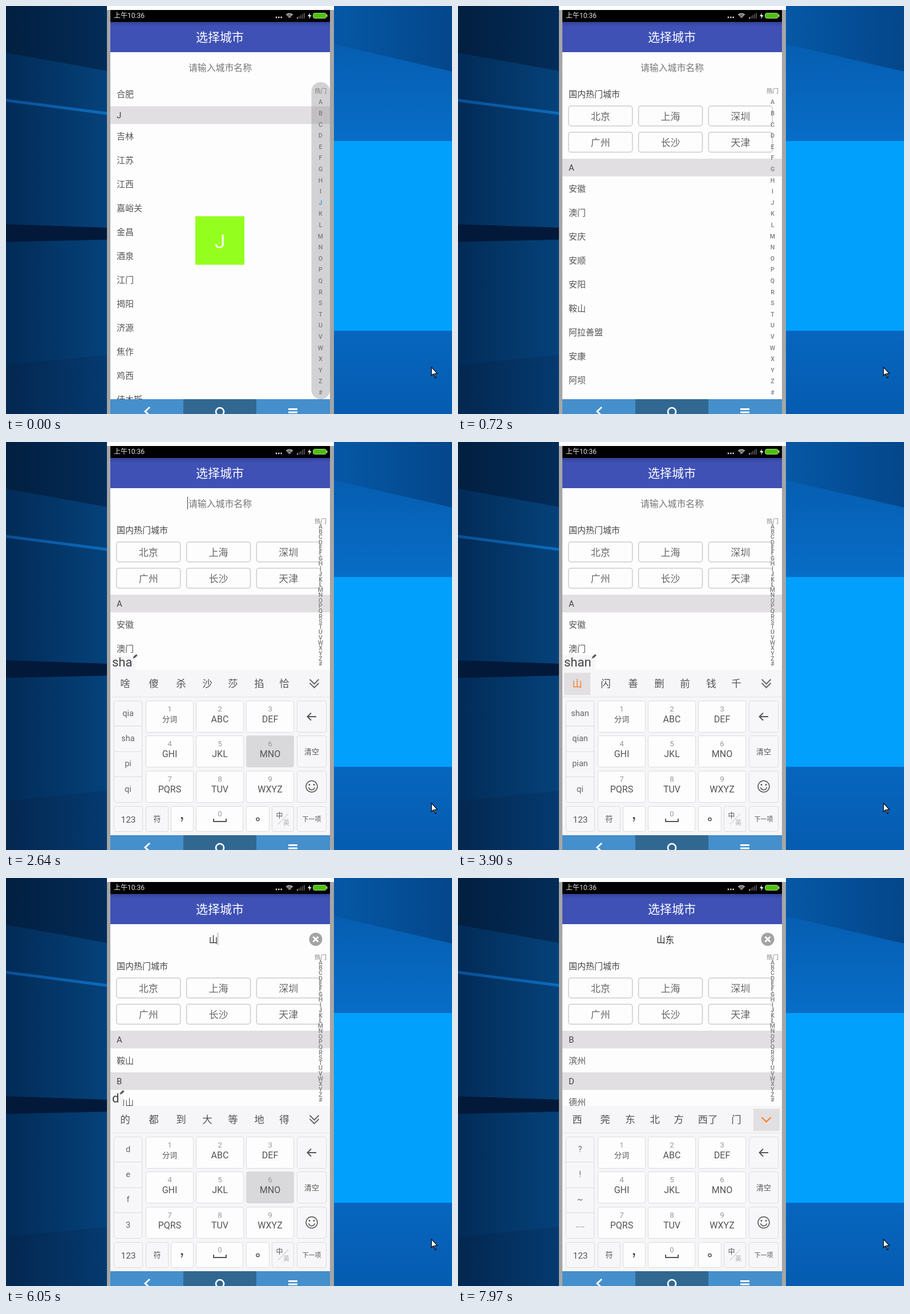
An HTML page with a canvas that plays this animation: 782x716 px, repeating every 8000 ms.

```html
<!DOCTYPE html>
<html lang="zh-CN">
<head>
<meta charset="utf-8">
<title>选择城市</title>
<style>
html, body { margin: 0; width: 100%; height: 100%; overflow: hidden; }
canvas { display: block; }
</style>
</head>
<body>
<canvas id="stage" width="782" height="716"></canvas>
<script>
const g = document.getElementById('stage').getContext('2d');
const LOOP = 8000;
const FONT = 'Roboto, "Noto Sans CJK SC", "Noto Sans CJK", sans-serif';
const INDEX = ['热门', ...'ABCDEFGHIJKLMNOPQRSTUVWXYZ#'];
const words = s => s.split(' ');

// List contents; a single capital is a section header.
const LIST = {
  J: words('合肥 J 吉林 江苏 江西 嘉峪关 金昌 酒泉 江门 揭阳 济源 焦作 鸡西 佳木斯'),
  G: words('阜新 G 广东 甘肃 贵州 广西 广州 贵阳 桂林 赣州 广元 广安 贵港 固原'),
  D: words('楚雄 D 大连 东莞 德州 大庆 东营 丹东 大同 大理 德阳 达州 定西 迪庆'),
  B: words('阿坝 B 北京 白山 保定 包头 宝鸡 北海 蚌埠 滨州 亳州 百色 巴中 白银'),
  all: words('A 安徽 澳门 安庆 安顺 安阳 鞍山 阿拉善盟 安康 阿坝'),
  shan: words('A 鞍山 B 白山'),
  shandong: words('B 滨州 D 德州')
};
const EVEN = [209, 259, 307, 353, 398, 444, 488];
const PAIR_3 = [209, 258, 311, 363, 405, 447, 488];
const PAIR_6 = [209, 258, 302, 345, 387, 438, 488];
const SYMBOLS = ['?', '!', '~', '……'];
const compose = (comp, side, cands, xs = EVEN) => ({ comp, side: words(side), cands: words(cands), xs });
const commit = (text, list, cands) => ({
  text, list, cands: words(cands), xs: PAIR_6, comp: '', side: SYMBOLS, pick: false, caret: true
});
const don = compose('don', 'don en fo d', '东 洞 恶魔 懂 动 冻 冬', PAIR_3);

// Each step changes part of the state at its time.
const STEPS = [
  [0, { list: 'J', drag: 'J', caret: false, text: '', kb: 0, comp: '', side: SYMBOLS, cands: [], xs: EVEN }],
  [150, { list: 'G', drag: 'G', caret: true }],
  [290, { list: 'D', drag: 'D' }],
  [430, { list: 'B', drag: 'B' }],
  [570, { list: 'all', drag: '热门' }],
  [720, { drag: '', caret: false }],
  [1250, { caret: true }],
  [1400, { kb: .4 }],
  [1530, { kb: .85 }],
  [1670, { kb: 1 }],
  [1820, { caret: false }],
  [2250, { caret: true, key: 6 }],
  [2390, { key: 3, ...compose('p', 'p q r s', '去 人 是 请 让 平 跑') }],
  [2520, { key: 1, ...compose('qi', 'qi pi sh ri', '起 其 时 是 使 气 骑') }],
  [2640, { key: 5, ...compose('sha', 'qia sha pi qi', '啥 傻 杀 沙 莎 掐 恰') }],
  [2790, { key: -1, caret: false, ...compose('shan', 'shan qian pian qi', '山 闪 善 删 前 钱 千') }],
  [3190, { caret: true }],
  [3780, { caret: false, pick: true }],
  [3930, commit('山', 'shan', '东 西 上 寨 水 东省 庄')],
  [4480, { caret: false }],
  [5000, { caret: true }],
  [5530, { caret: false }],
  [5900, { caret: true, key: 2 }],
  [6040, { key: 5, ...compose('d', 'd e f 3', '的 都 到 大 等 地 得') }],
  [6190, { key: 5, ...compose('en', 'en fo d e', '嗯 佛 恩 摁 哦 的 额') }],
  [6330, { key: -1, ...don }],
  [6470, { key: 3, caret: false }],
  [6620, { key: -1, ...compose('dong', 'dong en fo d', '东 洞 懂 动 冻 冬 栋') }],
  [6990, { pick: true }],
  [7140, commit('山东', 'shandong', '西 莞 东 北 方 西了 门')],
  [7570, { caret: false }],
  [7970, { fold: true }]
];

function rect(x, y, w, h, fill) {
  g.fillStyle = fill;
  g.fillRect(x, y, w, h);
}
function poly(fill, ...p) {
  g.fillStyle = fill;
  g.beginPath();
  for (let i = 0; i < p.length; i += 2) g.lineTo(p[i], p[i + 1]);
  g.fill();
}
function line(color, width, ...p) {
  g.strokeStyle = color;
  g.lineWidth = width;
  g.beginPath();
  for (let i = 0; i < p.length; i += 2) g.lineTo(p[i], p[i + 1]);
  g.stroke();
}
function box(x, y, w, h, r, fill, stroke, width = 1) {
  g.beginPath();
  g.roundRect(x, y, w, h, r);
  if (fill) { g.fillStyle = fill; g.fill(); }
  if (stroke) { g.strokeStyle = stroke; g.lineWidth = width; g.stroke(); }
}
function arc(x, y, r, color, width, from = 0, to = 2 * Math.PI) {
  g.strokeStyle = color;
  g.lineWidth = width;
  g.beginPath();
  g.arc(x, y, r, from, to);
  g.stroke();
}
function dot(x, y, r, fill) {
  g.fillStyle = fill;
  g.beginPath();
  g.arc(x, y, r, 0, 2 * Math.PI);
  g.fill();
}
// y is the visual middle of the text; the baseline sits on a whole pixel.
function text(s, x, y, size, color, align = 'center', weight = 400) {
  g.font = `${weight} ${size}px ${FONT}`;
  g.textAlign = align;
  g.fillStyle = color;
  g.fillText(s, x, Math.round(y + size * .365));
}
function shade(x0, y0, x1, y1, ...colors) {
  const grad = g.createLinearGradient(x0, y0, x1, y1);
  colors.forEach((c, i) => grad.addColorStop(i / (colors.length - 1), c));
  return grad;
}

function drawDesktop() {
  const across = (...colors) => shade(0, 0, 177, 0, ...colors);
  rect(0, 0, 177, 716, across('#022b57', '#05427a'));
  poly(across('#021f40', '#032c58'), 0, 0, 177, 0, 177, 114, 0, 82);
  poly(across('#0a4f94', '#0b6cbe'), 0, 163, 177, 186, 177, 191, 0, 168);
  poly('#02193a', 0, 383, 177, 389, 177, 410, 0, 414);
  poly(across('#032750', '#053a70'), 0, 630, 177, 612, 177, 716, 0, 716);

  rect(575, 0, 207, 716, shade(0, 0, 0, 716, '#0558a8', '#0768c0', '#0778d4', '#0768c2', '#055cb0'));
  poly(shade(575, 0, 782, 0, '#0558a6', '#04468a'), 575, 0, 782, 0, 782, 115, 575, 67);
  rect(575, 237, 333, 333, '#00a0fc');

  poly('#000', 745.5, 632.5, 745.5, 650, 749.5, 646.5, 752.5, 653, 755, 652, 752.3, 645.5, 757.5, 645.5);
  poly('#fff', 746.7, 635.5, 746.7, 647.3, 750, 644.5, 753, 651, 753.6, 650.7, 750.8, 644.4, 755, 644.4);
}

function drawChrome() {
  rect(177, 0, 398, 7, '#fff');
  rect(177, 7, 398, 709, '#a6a6a6');
  rect(183, 7, 385, 683, '#fdfdfd');
  rect(183, 7, 385, 21, '#000');
  text('上午10:36', 189, 17, 12, '#e4e4e4', 'left');
  for (let i = 0; i < 3; i++) dot(474 + i * 4.3, 20, 1.4, '#ddd');
  for (const r of [3, 6, 8.5]) arc(497, 22, r, '#ddd', 1.6, -2.3, -.84);
  for (let i = 0; i < 5; i++) rect(510 + i * 3, 20 - i * 2, 2, 2 + i * 2, i < 1 ? '#ccc' : '#4a4a4a');
  poly('#eee', 533, 12, 529, 18, 532, 18, 531, 23, 535.5, 16, 532.5, 16);
  box(538.5, 12.5, 23, 9, 3, '#4fc00c', '#a5d98c');
  rect(562, 15, 1.5, 4, '#a5d98c');

  rect(183, 28, 385, 53, '#3f51b5');
  rect(183, 28, 385, 8, shade(0, 28, 0, 36, '#33429a', '#3f51b5'));
  text('选择城市', 375, 54.6, 21, '#fff');
}

function drawNav() {
  rect(183, 690, 385, 26, '#448fcc');
  rect(311, 690, 128, 26, '#306892');
  line('#fff', 3, 252, 704, 244, 711.5, 252, 719);
  arc(375, 712, 7, '#fff', 2.6);
  rect(495, 706, 16, 3, '#fff');
  rect(495, 711.5, 16, 3, '#fff');
}

function drawSearch(s) {
  if (s.text) {
    text(s.text, 363.5, 108, 15.5, '#222');
    dot(543, 107.5, 11.5, '#a3a3a3');
    line('#fff', 2.8, 538.5, 103, 547.5, 112);
    line('#fff', 2.8, 547.5, 103, 538.5, 112);
  } else text('请输入城市名称', 375.5, 108, 15.9, '#777');
  if (s.caret) rect(s.text ? 363 + 8 * s.text.length : 318, 96, 1, 22, s.text ? '#999' : '#444');
}

function drawList(name) {
  let y = 133.5;
  if (LIST[name][0].length === 1) {
    text('国内热门城市', 194, 154.8, 15, '#444', 'left');
    words('北京 上海 深圳 广州 长沙 天津').forEach((city, i) => {
      const x = 193.7 + i % 3 * 122.8, top = i < 3 ? 175.5 : 221.5;
      box(x, top, 112, 35, 4, '#fdfdfd', '#cbcbcb', 1.5);
      text(city, x + 56, top + 18, 17, '#666');
    });
    y = 267.5;
  }
  for (const row of LIST[name]) {
    const head = row.length === 1, h = head ? 31.4 : 42;
    if (head) rect(183, Math.round(y), 385, 31, '#e1dfe2');
    text(row, 194, y + h / 2 + .4, 15, head ? '#444' : '#555', 'left');
    y += h;
  }
}

function drawIndex(s) {
  const tight = s.kb >= .85, top = tight ? 138.7 : 149, gap = tight ? 9.28 : 19.6;
  if (s.drag) box(535.5, 133.5, 32.5, 556.5, 16, 'rgba(140,138,142,.38)');
  INDEX.forEach((c, i) => text(c, 551.5, top + i * gap, 10.6, c === s.drag ? '#2a96ee' : '#7d7d7d', 'center', 500));
  if (s.drag) {
    rect(332, 369, 86, 85, '#94ff1e');
    text(s.drag, 375, 413, 33, '#fff');
  }
}

function drawKey(x, y, w, h, plain, down) {
  box(x + .5, y + .5, w - 1, h - 1, 3, down ? '#d9d8da' : plain ? '#fdfdfd' : '#f7f6f8', '#dcdbde');
}

function drawToolbar(s) {
  const ink = '#6b6b6b';
  rect(183, 447, 385, 1, '#e5e4e7');
  if (s.pick) rect(186, 405, 46, 39, '#e1dfe2');
  if (s.cands.length) s.cands.forEach((c, i) => text(c, s.xs[i], 424, 17.5, s.pick && !i ? '#ff7a1a' : '#555'));
  else {
    for (let i = 0; i < 12; i++) rect(202 + i % 4 * 4, 418 + (i >> 2) * 4, 3, 3, ink);
    rect(204, 429.5, 11, 2, ink);
    box(252.5, 416.5, 7, 12, 3.5, '', ink, 1.5);
    arc(256, 424, 7.5, ink, 1.5, 0, Math.PI);
  }
  if (s.fold) rect(518, 405, 46, 39, '#e1dfe2');
  const chevron = y => line(s.fold ? '#ff7a1a' : ink, 2, 532.5, y, 540.5, y + 8, 548.5, y);
  if (s.comp) { chevron(416.5); chevron(423); } else chevron(420);
}

function drawKeyboard(s) {
  const ink = '#555';
  g.save();
  g.beginPath();
  g.rect(183, 82, 385, 608);
  g.clip();
  g.translate(0, 290 * (1 - s.kb));
  rect(183, 400, 385, 290, '#f6f5f7');
  drawToolbar(s);

  if (s.comp) {
    g.font = `22px ${FONT}`;
    const end = 186 + g.measureText(s.comp).width;
    rect(183, 374, end - 176, 26, '#f6f5f7');
    text(s.comp, 186, 386, 22, '#444', 'left');
    line('#555', 3.2, end + 3, 378, end + 8, 373.5);
    poly('#555', end + 1, 380, end + 2, 377, end + 4, 379);
  }

  drawKey(189, 454, 50, 179);
  s.side.forEach((c, i) => {
    if (i) rect(190, Math.round(454 + i * 44.3), 48, 1, '#dcdbde');
    text(c, 214, 475.5 + i * 44.3, c === '……' ? 12 : 14.5, '#666');
  });
  words('分词 ABC DEF GHI JKL MNO PQRS TUV WXYZ').forEach((label, i) => {
    const x = 245 + i % 3 * 88, y = Math.round(454 + (i / 3 | 0) * 61.4);
    drawKey(x, y, 84, 56, true, s.key === i);
    text(i + 1, x + 42, y + 14, 13.5, '#999');
    text(label, x + 42, y + 32.3, i ? 16 : 13, ink);
  });

  for (let i = 0; i < 3; i++) drawKey(510, Math.round(454 + i * 61.4), 52, 56);
  line(ink, 2, 544, 482, 529, 482);
  line(ink, 2, 535, 475.5, 528.5, 482, 535, 488.5);
  text('清空', 536, 543.5, 13, ink);
  arc(536, 604.5, 10, ink, 1.5);
  arc(536, 605, 5.5, ink, 1.5, .2, Math.PI - .2);
  dot(532, 601.5, 1.4, ink);
  dot(540, 601.5, 1.4, ink);

  for (const [x, w, plain] of [[189, 51], [245, 40], [289, 40, 1], [333, 83, 1], [421, 41, 1], [466, 39], [510, 52]])
    drawKey(x, 639, w, 45, plain);
  text('123', 214.5, 662, 15.5, ink);
  text('符', 265, 661.5, 13, ink);
  dot(308.5, 660, 2, ink);
  line(ink, 1.5, 309.8, 660, 309, 664, 307, 666);
  text('0', 375, 652, 13, '#999');
  line(ink, 2, 364, 661, 364, 666, 386, 666, 386, 661);
  arc(441.5, 662, 2.6, ink, 1.5);
  text('中', 479.5, 656, 12, ink);
  line('#bbb', 1, 477, 671, 495, 652);
  text('英', 491.5, 668, 11, '#aaa');
  text('下一项', 536, 661.5, 11, ink);
  g.restore();
}

const start = performance.now();
function frame() {
  const t = (performance.now() - start) % LOOP;
  const s = Object.assign({}, ...STEPS.filter(([at]) => at <= t).map(([, change]) => change));
  drawDesktop();
  drawChrome();
  drawSearch(s);
  drawList(s.list);
  drawIndex(s);
  if (s.kb) drawKeyboard(s);
  drawNav();
  requestAnimationFrame(frame);
}
frame();
</script>
</body>
</html>
```
